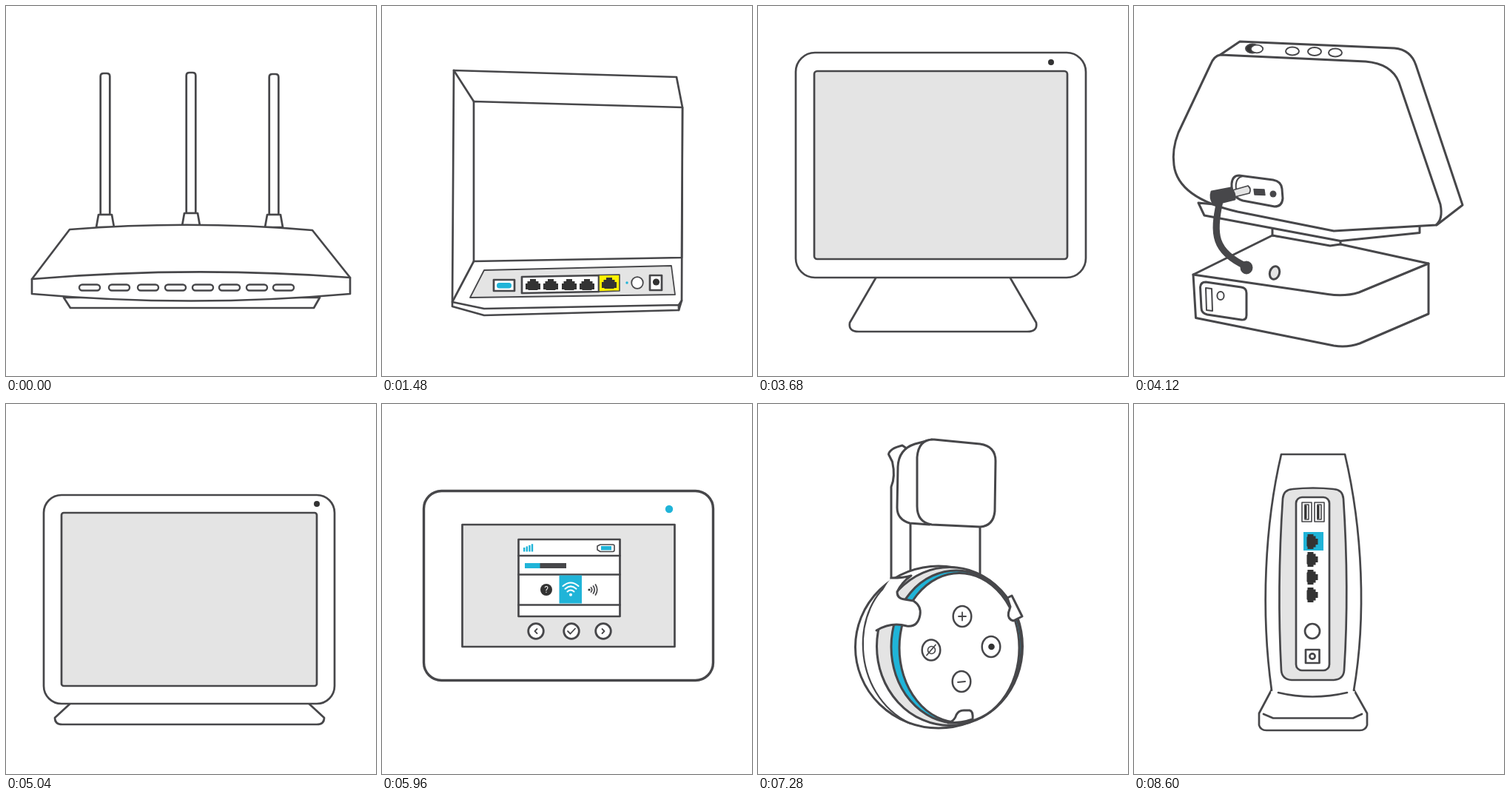
An HTML page for the animation above (9000 ms loop, 500 by 500 pixels).

```html
<!DOCTYPE html>
<html lang="en">
<head>
<meta charset="utf-8">
<title>Devices</title>
<style>
html, body { margin: 0; width: 100%; height: 100%; overflow: hidden; background: #fff; }
svg { display: block; width: 100vw; height: 100vh; }
</style>
</head>
<body>
<svg id="stage" viewBox="0 0 500 500" fill="#fff" stroke="#47474a" stroke-width="2.7" stroke-linejoin="round" stroke-linecap="round"></svg>
<script>
const INK = '#47474a', DARK = '#333', CYAN = '#20b4d8', GREY = '#e4e4e4', CLOTH = '#d0d0d0';

// Shape helpers
const path = (d, fill = '#fff', extra = '') => `<path d="${d}" fill="${fill}" ${extra}/>`;
const line = (d, extra = '') => path(d, 'none', extra);
const flat = (d, fill) => path(d, fill, 'stroke="none"');
const rect = (x, y, w, h, rx = 0, fill = '#fff', extra = '') =>
  `<rect x="${x}" y="${y}" width="${w}" height="${h}" rx="${rx}" fill="${fill}" ${extra}/>`;
const block = (x, y, w, h, fill, rx = 0) => rect(x, y, w, h, rx, fill, 'stroke="none"');
const oval = (x, y, rx, ry, fill = '#fff', extra = '') =>
  `<ellipse cx="${x}" cy="${y}" rx="${rx}" ry="${ry}" fill="${fill}" ${extra}/>`;
const circle = (x, y, r, fill, extra) => oval(x, y, r, r, fill, extra);
const dot = (x, y, r, fill) => circle(x, y, r, fill, 'stroke="none"');
const each = (list, draw) => list.map(draw).join('');
const heavy = shapes => `<g stroke-width="3">${shapes}</g>`;
const port = (x, y, turn = 0) =>
  `<path transform="translate(${x} ${y}) rotate(${turn})" d="M-10 7V-1H-7.5V-4H-4V-7H4V-4H7.5V-1H10V7H7L6 8H-6L-7 7Z" fill="${DARK}" stroke="none"/>`;

// Seven-segment digits
const SEGMENTS = {
  a: 'M1 0H30L23 8H8Z',
  b: 'M30 4V22L26 26L22 22V11Z',
  c: 'M30 51V33L26 29L22 33V44Z',
  d: 'M1 55H30L23 47H8Z',
  e: 'M0 51V33L4 29L8 33V44Z',
  f: 'M0 4V22L4 26L8 22V11Z',
  g: 'M9 23.5H21L25 27.5L21 31.5H9L5 27.5Z'
};
const digit = (x, on) => `<g transform="translate(${x} 239)">${each([...on], s => flat(SEGMENTS[s], '#fff'))}</g>`;

const antennaShell = () =>
  each([[134, 91, 282], [250, 90, 280], [362, 92, 282]], ([x, top, foot]) =>
    path(`M${x - 6.3} ${foot}V${top + 4}Q${x - 6.3} ${top} ${x - 2} ${top}H${x + 2}Q${x + 6.3} ${top} ${x + 6.3} ${top + 4}V${foot}Z`) +
    path(`M${x - 9} ${foot}H${x + 9}L${x + 12} ${foot + 17}H${x - 12}Z`)) +
  path('M78 394L87 408H416L424 394Z') +
  path('M35 369L86 302Q250 289 414 303L465 367Z') +
  path('M35 369Q250 351 465 367V389Q250 408 35 389Z');

const antennaFront = () => antennaShell() +
  each([99, 139, 178, 215, 252, 288, 325, 361], x => rect(x, 376.5, 28, 8, 4, '#fff', 'stroke-width="2.4"'));

const antennaBack = () => antennaShell() +
  each([130, 160, 190, 220], x => port(x, 381)) + block(243, 370, 28, 22, '#fff200') + port(257, 381) +
  circle(300, 381, 7) + rect(330, 373, 16, 16) + dot(338, 381, 4, DARK);

const flatRouter = () =>
  path('M37 340L92 170Q250 156 410 170L466 340Z') +
  path('M37 340H466V368Q464 380 450 380H53Q39 380 37 368Z') +
  each([190, 215, 240, 265, 290], x => dot(x, 360, 4, CYAN));

const tallRouter = () =>
  path('M136 34H352Q366 34 368 48L386 430H102L120 48Q122 34 136 34Z') +
  path('M102 430H386L406 452Q406 464 394 464H92Q81 464 81 452Z') + dot(244, 90, 5, CYAN);

const boxBack = () =>
  path('M97 87L398 96L406 137L405 398L401 411L138 418L95 406Z') +
  path('M124 129L406 137L405 340L124 345Z') +
  line('M97 87L124 129M124 345L95 400L138 409L401 404L405 398M401 404V411') +
  path('M138 357L391 351L396 390L119 394Z', GREY, 'stroke-width="1.8"') +
  rect(151, 370, 28, 15) + block(155, 374, 20, 7.5, CYAN, 3.5) +
  path('M189 366L293 364V386L189 388Z') +
  path('M293 363.5L321 363V385L293 386Z', '#fff200', 'stroke-width="1.6"') +
  each([204, 228, 253, 277], x => port(x, 376)) + port(307, 374) +
  dot(331, 374, 1.7, CYAN) + circle(345, 374, 7.8, '#fff', 'stroke-width="1.8"') +
  rect(362, 364, 16, 20) + dot(370.5, 373, 4.6, DARK);

const boxFront = () =>
  path('M102 94L384 82L407 128V406L378 420L112 429L95 404Z') +
  line('M102 94L126 132L407 128M126 132L120 404L407 406M120 404L112 429') + dot(260, 380, 5, CYAN);

const hotspotShell = () => rect(56.5, 117.5, 391, 256, 24, '#fff', 'stroke-width="3.4"') + dot(388, 142, 5.2, CYAN);

const hotspotPlain = () => hotspotShell() + rect(108.5, 163, 287, 165, 0, GREY);

const CLOCK_BODY = 'M107 348A172 172 0 1 1 421.5 259C421 310 405 362 384 387L360 411Q346 427 250 427Q160 425 148 408L129 388Z';
const clockFront = () =>
  path(CLOCK_BODY) +
  path('M107 348A172 172 0 1 1 421.5 259C393 314 336 377 233 377Q164 376 107 348Z', CLOTH) +
  path('M129 389Q250 420 385 386L370 403Q250 428 146 406Z', CYAN) +
  line('M146 406L156 417Q250 436 350 417L370 403') +
  digit(83, 'bc') + digit(119, 'bc') + dot(170, 255, 4.2, '#fff') + dot(170, 279, 4.2, '#fff') +
  digit(192, 'abcdg') + digit(243.5, 'abcdef');

const clockBack = () =>
  path(CLOCK_BODY) +
  path('M78 259A172 172 0 1 1 421.5 259Q390 352 250 358Q110 352 78 259Z', CLOTH) +
  path('M129 389Q250 420 385 386L370 403Q250 428 146 406Z', CYAN) +
  rect(212, 368, 76, 26, 13) + dot(235, 381, 6, DARK) + dot(265, 381, 4, DARK);

const displayFront = () =>
  path('M160 366H340L376 428Q378 440 364 440H136Q122 440 124 428Z') +
  rect(51, 63, 392, 304, 26) + rect(76, 88, 342, 254, 4, GREY) + dot(396, 76, 4, DARK);

const displayBack = () => heavy(
  path('M80 363L187 310L279 322L398 348V416L305 456Q288 462 270 459L83.5 421.5Z') +
  line('M80 363L262 389.5Q285 393 304 387L398 348') +
  path('M187 298V310L265 324L279 322V312') +
  path('M87 266L95 283L279 317.5L386 306.5V294Z') +
  path('M109 71L143 48L352 57Q374 59 381 80L444 269L409 296Z') +
  path('M117 66L313 75Q348 78 358 103L414 268Q418 288 408 296L270 304L140 278C92 267 58 248 54 215Q51 194 60 171L103 80Q108 67 117 66Z') +
  oval(160, 57.5, 9, 6, DARK, 'stroke-width="2"') + oval(166, 58, 8.2, 5.3, '#fff', 'stroke-width="1.8"') +
  each([[214, 61], [244, 61.5], [272, 63]], ([x, y]) => oval(x, y, 9, 5.6, '#fff', 'stroke-width="2"')) +
  path('M142 229L188 235Q199 237 200 247L201 260Q200 271 190 271L147 263Q131 258 132 240Q133 229 142 229Z') +
  line('M147 230Q136 232 138 248', 'stroke-width="2"') +
  path('M133 249L154 243Q159 247 156 253L136 258Z', GREY, 'stroke-width="1.8"') +
  path('M162 247.5L176 248L177 255.5L163 255Z', INK, 'stroke-width="1.4"') + dot(188, 254, 4.5, INK) +
  line('M116 264C106 308 108 332 152 352', 'stroke-width="9"') +
  path('M105 251L131 246Q137 253 136 261L108 268Q102 260 105 251Z', INK) +
  oval(152, 353.5, 7.5, 8, INK, 'stroke-width="2"') +
  oval(190, 360.5, 6.5, 9, GREY, 'transform="rotate(16 190 360.5)"') +
  path('M97 373L145 380Q152 381 152 388V418Q152 425 145 424L99 417Q91 415 91 408L89.5 380Q90 373 97 373Z') +
  path('M97 381L105 382L106 412L98 411Z', '#fff', 'stroke-width="2"') + oval(117, 391.5, 4.6, 5.5, '#fff', 'stroke-width="2"'));

const displayTilt = () =>
  path('M148 362L96 410V438L250 452L404 438V410L352 362Z') + line('M96 410L250 424L404 410') +
  path('M70 57H426Q444 57 444 75V352Q444 370 426 370H70Q52 370 52 352V75Q52 57 70 57Z') +
  rect(74, 80, 348, 266, 3, GREY);

const wedgeFront = () =>
  path('M92 400L66 424Q66 433 76 433H420Q430 433 430 424L404 400Z') +
  rect(51, 123, 393, 282, 24) + rect(75, 147, 345, 234, 3, GREY) + dot(420, 135, 4, DARK);

const wedgeBack = () =>
  path('M130 123H370Q386 123 392 138L444 380Q446 407 420 407H80Q54 407 56 380L108 138Q114 123 130 123Z') +
  rect(190, 330, 120, 40, 18) + dot(222, 350, 7, DARK) + block(245, 344, 18, 11, DARK) + dot(282, 350, 5, DARK);

const button = (x, icon) => circle(x, 307, 10.3, '#fff', 'stroke-width="2.8"') +
  line(`M${x} 307${icon}`, 'stroke-width="1.8"');
const hotspotMenu = () => hotspotPlain() +
  rect(184.5, 183, 137, 104) +
  line('M184.5 205H321.5M184.5 230.5H321.5M184.5 271.5H321.5') +
  each([0, 1, 2, 3], i => block(191 + i * 3.6, 194 - i * 1.6, 2.4, 5.5 + i * 1.6, CYAN)) +
  path('M295 190H312Q314 190 314 192V197Q314 199.5 312 199.5H295L291 197V192Z', '#fff', 'stroke-width="1.6"') +
  block(296, 192, 14, 5.5, CYAN) +
  block(193, 215, 56, 7, INK) + block(193, 215, 20.5, 7, CYAN) +
  dot(222, 251, 8, DARK) +
  '<text x="222" y="255.2" font-family="Roboto, sans-serif" font-size="12" text-anchor="middle" stroke="none">?</text>' +
  block(239.5, 231.5, 30.5, 38, CYAN) + dot(255, 257.8, 2, '#fff') +
  line('M250.5 253.5Q255 249.5 259.5 253.5M247.5 249.8Q255 243 262.5 249.8M244.5 246Q255 237 265.5 246', 'stroke="#fff" stroke-width="2"') +
  dot(280, 251, 1.6, DARK) +
  line('M282.5 248Q285 251 282.5 254M285.5 246Q289 251 285.5 256M288.5 244Q293 251 288.5 258', 'stroke-width="1.7"') +
  button(208, 'm1.5 -3l-3 3l3 3') + button(256, 'm-5 0l3.5 3.5l6.5 -7') + button(299, 'm-1.5 -3l3 3l-3 3');

const roundUnit = () =>
  rect(56, 65, 390, 362, 60) + rect(86, 95, 330, 302, 40, GREY) + circle(251, 246, 60) + dot(251, 246, 6, CYAN);

const slimUnit = () =>
  rect(54, 130, 392, 240, 30) + line('M54 330H446') + each([210, 237, 264, 291], x => dot(x, 350, 4, CYAN));

const pad = (x, y, icon) => oval(x, y, 12.3, 14, '#fff', 'stroke-width="2.5"') +
  line(`M${x} ${y}${icon}`, 'stroke-width="1.8"');
const CLIP_EDGE = 'M180 235Q198 235 207 232Q194 241 188 254Q188 263 198 264L210 266Q221 273 219 285Q216 302 201 300Q180 294 160 306';
const wallMount = () => heavy(
  path('M180 240V112Q186 98 181.5 78L176.5 68Q178 60 195 56L230 80V240Z') +
  rect(206, 150, 94, 90) +
  path('M235 48L212 54Q190 61 189 85L188 140Q188 156 205 161L232 163Z') +
  path('M238 48L300 54Q321 57 321 77L320 145Q318 165 300 166L235 163Q215 160 215 138V72Q217 47 238 48Z') +
  oval(244, 328.5, 112.5, 109.5) +
  line('M186 237C125 270 123 392 206 432', 'stroke-width="2.2"') +
  oval(259, 327.5, 98.5, 107, GREY) +
  oval(268, 328, 88, 103, CYAN) + oval(272, 329.5, 81, 101) +
  flat(`${CLIP_EDGE}Q156 264 180 235Z`, '#fff') + line(CLIP_EDGE) +
  path('M337 262L343 259L357 287L345 293Q337 291 338.5 282L341 274Z') +
  path('M257 431Q266 428 268 420Q271 414 278 414H286Q291 415 290 426Q276 431 257 431Z') +
  pad(276, 287, 'm-5 0h10m-5 -5.5v11') + pad(275, 375, 'm-5 1l10 -1') +
  pad(315, 328, '') + dot(315.5, 328, 4.3, DARK) +
  pad(234, 332.5, 'm-6 7l12 -14') + circle(234.5, 332.5, 5, 'none', 'stroke-width="1.6"'));

const puck = () =>
  oval(245, 267, 113, 172) + oval(245, 262, 98, 150, CYAN) + oval(245, 260, 91, 142) +
  pad(245, 190, 'm-5 0h10m-5 -5.5v11') + pad(245, 330, 'm-5 0h10');

const corded = () =>
  line('M243 390V500', 'stroke-width="8" stroke-linecap="butt"') +
  circle(242.5, 244, 149.5) + circle(242.5, 244, 128, GREY) + circle(242.5, 244, 60) + dot(242.5, 244, 6, CYAN);

const tower = () =>
  path('M186 386L169 418V434Q171 441 179 441H305Q313 441 315 434V418L297 386Z') +
  flat('M199 68H285C309 170 314 288 297 386Q300 390 297 390H186Q184 390 186 386C171 280 177 162 199 68Z', '#fff') +
  line('M186 387C171 280 177 162 199 68H285C309 170 314 288 297 387') +
  line('M195 390Q241 401 288 390M175 419L188 424.5H296L308 419') +
  path('M214 115Q242 112 270 115Q282 116 283 128Q291 250 284 360Q283 372 270 373H213Q200 372 199 360Q193 250 201 128Q202 116 214 115Z', GREY) +
  rect(219, 126, 45, 234, 8) +
  each([227, 244], x => rect(x, 133, 13, 26, 0, '#fff', 'stroke-width="1.6"') + rect(x + 4, 136, 5, 20, 0, '#fff', 'stroke-width="1.6"') + block(x + 3.5, 137, 3, 18, DARK)) +
  block(229, 173, 27, 25, CYAN) +
  each([186, 210, 234, 258], y => port(241.5, y, 90)) +
  circle(241, 307, 10) + rect(232, 332, 18.5, 18) + circle(241, 341, 3.6);

// [drawing, hold in ms, blends in]
const SLIDES = [
  [antennaFront, 160], [antennaBack, 440, true], [flatRouter, 440], [tallRouter, 440],
  [boxBack, 440], [boxFront, 440], [hotspotPlain, 440], [clockFront, 440], [clockBack, 440],
  [displayFront, 440], [displayBack, 440], [displayTilt, 440], [wedgeFront, 480, true],
  [wedgeBack, 480, true], [hotspotMenu, 440], [roundUnit, 440], [slimUnit, 440],
  [wallMount, 440], [puck, 440], [corded, 440], [tower, 400]
];
const LOOP = 9000, BLEND = 40;

const stage = document.getElementById('stage');
stage.innerHTML = each(SLIDES, ([draw]) => `<g>${draw()}</g>`);
const groups = [...stage.children];

function render(time) {
  let t = time % LOOP, now = 0;
  while (t >= SLIDES[now][1]) t -= SLIDES[now++][1];
  const blending = SLIDES[now][2] && t < BLEND;
  groups.forEach((g, i) => {
    const shown = i === now || (blending && i === now - 1);
    g.style.display = shown ? '' : 'none';
    g.style.opacity = blending ? 0.5 : 1;
  });
}

const start = performance.now();
function tick() {
  render(performance.now() - start);
  requestAnimationFrame(tick);
}
tick();
</script>
</body>
</html>
```
